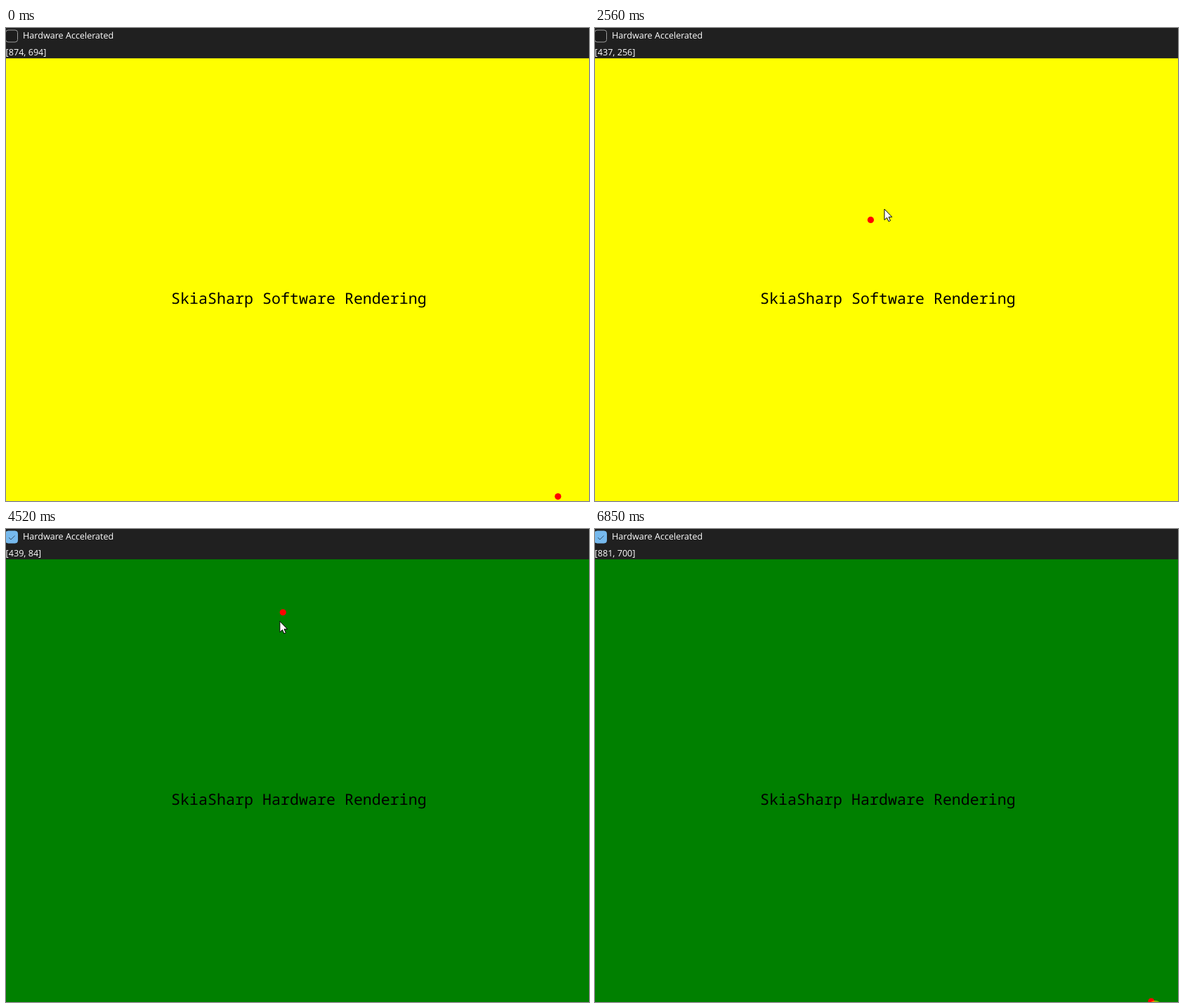
An HTML page that plays this animation: 830 px wide and 674 px high, repeating every 6920 ms.

```html
<!DOCTYPE html>
<html lang="en">
<head>
<meta charset="utf-8">
<title>Rendering modes</title>
<style>
  html, body { margin: 0; width: 100%; height: 100%; overflow: hidden; background: #202020; }
  svg { display: block; width: 830px; height: 674px; }
  text { text-rendering: geometricPrecision; white-space: pre; }
  .ui { font: 500 12.6px "Open Sans", sans-serif; fill: #fff; }
  .title { font: 21.67px "Noto Sans Mono", monospace; }
</style>
</head>
<body>
<svg viewBox="0 0 830 674">
  <rect id="surface" y="43" width="830" height="631"/>
  <text id="title" class="title" x="235" y="393"></text>
  <circle id="dot" r="4.6" fill="#f00"/>
  <rect width="830" height="43.2" fill="#202020"/>
  <rect id="box" x="-.5" y="3" width="17" height="17" rx="3.5"/>
  <path id="tick" d="M4 12.2 7 15 12.6 9.6" fill="none" stroke="#35536c"/>
  <text class="ui" x="24" y="15">Hardware Accelerated</text>
  <text id="label" class="ui" x="-.4" y="39.3"></text>
  <circle id="press" r="10.5" fill="#ff0" opacity=".52"/>
  <path id="arrow" d="M0 0V15.5L3.6 12.2 6 17.6 8.5 16.5 6.2 11.3H10.8Z" fill="#fff" stroke="#000" stroke-linejoin="round"/>
  <path id="hand" d="M-1.6 1.2Q0-1 1.6 1.2V6.5Q3.2 5.5 4 7.2 5.6 6.4 6.3 8.2 8.3 7.6 8.3 10V14Q8.3 16.5 6.6 19H-1Q-2.5 16-5 12.5-5.6 10-3.5 10.4L-1.6 12Z" fill="#fff" stroke="#222" stroke-width=".8"/>
</svg>
<script>
const LOOP = 6920, START = 190, BURST = 730, STEP = 60;
const TOP = 43.2, SCALE = 0.9;
const CLICK = 3550, SWITCH = 3670, LEAVE = 3880;
const EXIT = 3470, END = 6610;

// Turning points of the pointer's wander: time, x, y
const wander = [
  [130, 786.6, 667.6], [590, 752, 455], [980, 581.4, 260.8], [1220, 425, 262],
  [1350, 460, 310], [1560, 655, 240], [1770, 560, 262], [2010, 335, 207],
  [2250, 300, 270], [2500, 393.3, 273.4], [2560, 412, 258], [2800, 270, 158],
  [EXIT, 32.5, 45], [3530, 15, 11], [3820, 15, 11], [4060, 60, 176],
  [4400, 385, 115], [4700, 330, 200], [4960, 375, 298], [5240, 547.8, 276],
  [5300, 591, 277], [5640, 660, 430], [5800, 595, 505], [END, 792.7, 673]
];

const $ = id => document.getElementById(id);
const set = (id, attrs) => {
  for (const name in attrs) $(id).setAttribute(name, attrs[name]);
};
const show = (id, on) => set(id, { visibility: on ? "visible" : "hidden" });
const clamp = (v, low, high) => Math.min(Math.max(v, low), high);

function slope(i, axis) {
  const here = wander[i], prev = wander[i - 1] || here, next = wander[i + 1] || here;
  if (here[axis] === prev[axis] || here[axis] === next[axis]) return 0;
  return (next[axis] - prev[axis]) / (next[0] - prev[0]);
}

// Cubic Hermite curve through the turning points
function pointerAt(time) {
  const t = clamp(time, wander[0][0], END);
  const i = wander.findIndex(p => p[0] >= t && p !== wander[0]) - 1;
  const a = wander[i], b = wander[i + 1], span = b[0] - a[0], u = (t - a[0]) / span;
  return [1, 2].map(axis =>
    a[axis] + (b[axis] - a[axis]) * u * u * (3 - 2 * u) +
    span * u * (1 - u) * (slope(i, axis) * (1 - u) - slope(i + 1, axis) * u));
}

// Even bursts of twelve steps, the last one held a little longer
function refreshTime(t) {
  if (t < START) return 0;
  const inBurst = (t - START) % BURST;
  return t - inBurst + Math.min(Math.floor(inBurst / STEP), 11) * STEP;
}

// The dot trails by one step and waits while the pointer is off the surface
function dotAt(now) {
  const t = now - STEP;
  return pointerAt(t > EXIT && t < LEAVE ? EXIT : t);
}

function draw(t) {
  const now = refreshTime(t), hardware = t >= SWITCH;
  const [px, py] = pointerAt(now), [dx, dy] = dotAt(now);
  const pressing = t >= CLICK && t < SWITCH, leaving = t >= 6850;

  set("surface", { fill: hardware ? "#008000" : "#ff0" });
  $("title").textContent = `SkiaSharp ${hardware ? "Hardware" : "Software"} Rendering`;
  set("dot", { cx: dx - 0.8, cy: dy });
  $("label").textContent = `[${Math.round(dx / SCALE)}, ${Math.round((dy - TOP) / SCALE)}]`;

  const blue = t < LEAVE ? "#6aa3d8" : "#76b9ed";
  set("box", {
    fill: hardware ? blue : "#1c1c1c",
    stroke: hardware ? blue : pressing ? "#333" : "#9c9c9c"
  });
  show("tick", hardware);

  const onBar = py < TOP, inside = now >= START && now < END;
  for (const id of ["arrow", "hand"]) set(id, { transform: `translate(${px} ${py})` });
  show("arrow", inside && !onBar);
  show("hand", inside && onBar);

  show("press", pressing || leaving);
  set("press", leaving ? { cx: 797.5, cy: 682.5 } : { cx: 13, cy: 11 });
}

const began = performance.now();
function tick() {
  draw((performance.now() - began) % LOOP);
  requestAnimationFrame(tick);
}
tick();
</script>
</body>
</html>
```
